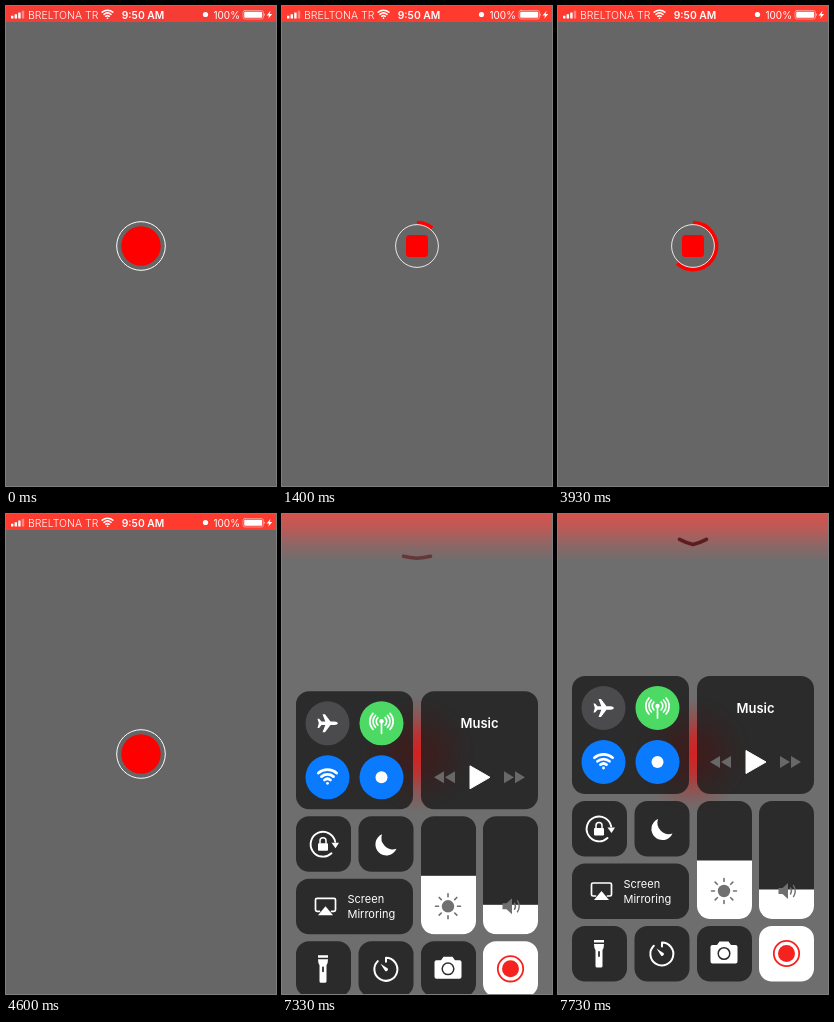
Animation of 270 by 480 pixels, one loop 7790 ms. Source, as an HTML page:

```html
<!DOCTYPE html>
<html lang="en">
<head>
<meta charset="utf-8">
<title>Record button</title>
<style>
  html, body { margin: 0; height: 100%; overflow: hidden; background: #666; }
  svg { display: block; width: 100vw; height: 100vh; font-family: Inter, Roboto, sans-serif; }
  .line { fill: none; stroke: #fff; stroke-linecap: round; stroke-linejoin: round; }
  .panel { fill: #1c1c1c; fill-opacity: .81; }
  .white { fill: #fff; }
  .gray { fill: #707070; }
</style>
</head>
<body>
<svg viewBox="0 0 270 480">
  <defs>
    <linearGradient id="topTint" x2="0" y2="1">
      <stop offset="0" stop-color="#d2544f"/>
      <stop offset=".3" stop-color="#bb5a57"/>
      <stop offset=".65" stop-color="#8b6766"/>
      <stop offset="1" stop-color="#6e6e6e"/>
    </linearGradient>
    <radialGradient id="glowTint">
      <stop offset="0" stop-color="#e01818" stop-opacity=".9"/>
      <stop offset=".35" stop-color="#d81c1c" stop-opacity=".7"/>
      <stop offset="1" stop-color="#a04040" stop-opacity="0"/>
    </radialGradient>
    <clipPath id="brightClip"><rect x="139" y="287" width="55" height="118" rx="13"/></clipPath>
    <clipPath id="volumeClip"><rect x="201" y="287" width="55" height="118" rx="13"/></clipPath>
    <g id="wifi" class="line" stroke-width="2.3">
      <path d="M-2.5-3.2A4 4 0 0 1 2.5-3.2M-5-6A7.8 7.8 0 0 1 5-6M-7.6-9A11.8 11.8 0 0 1 7.6-9"/>
      <circle r="1.2" cy="-.4" fill="#fff" stroke="none"/>
    </g>
  </defs>

  <rect width="270" height="480" fill="#666"/>
  <rect id="bar" width="270" height="16"/>
  <g class="white" font-size="10.5">
    <path d="M5 9.7h2.4v2.8H5zM8.6 8.3H11v4.2H8.6zM12.2 6.6h2.4v5.9h-2.4z"/>
    <path d="M15.8 4.7h2.4v7.8h-2.4z" opacity=".4"/>
    <text x="22" y="12.5" font-weight="300">BRELTONA TR</text>
    <use href="#wifi" transform="translate(101.5 12.5) scale(.7)"/>
    <text x="137" y="12.5" font-size="10.3" font-weight="600" text-anchor="middle">9:50 AM</text>
    <circle cx="199.5" cy="8.5" r="2.6"/>
    <text x="234" y="12.5" font-size="10" text-anchor="end">100%</text>
    <rect x="237" y="4.5" width="20.5" height="8.5" rx="2" class="line" stroke-width=".7" opacity=".6"/>
    <rect x="238.2" y="5.7" width="18" height="6.1" rx="1"/>
    <path d="M258.4 7.3q1.4 1.4 0 2.8zM264.6 4.8l-4 4.6h2.5l-.9 3.4 4-4.7h-2.5z"/>
  </g>

  <path id="arc" fill="none" stroke="#f00" stroke-width="4.1"/>
  <circle id="ring" cx="135" cy="240" fill="none" stroke="#fff"/>
  <rect id="core" fill="#f00"/>

  <g id="blur">
    <rect width="270" height="480" fill="#6e6e6e"/>
    <rect width="270" height="48" fill="url(#topTint)"/>
    <circle cx="135" cy="240" r="58" fill="url(#glowTint)"/>
  </g>

  <g id="center">
    <path id="chevron" class="line" style="stroke:#5c1c20" stroke-width="3.6"/>
    <g id="panels" class="panel"></g>

    <circle cx="45.5" cy="194" r="22" fill="#4b4b4d"/>
    <circle cx="99.5" cy="194" r="22" fill="#4cd964"/>
    <circle cx="45.5" cy="248" r="22" fill="#0a7aff"/>
    <circle cx="99.5" cy="248" r="22" fill="#0a7aff"/>
    <path class="white" transform="translate(45.5 194)" d="M10.5 0Q10-1.7 7-1.7H3L-2.5-9H-5L-2.2-1.7H-6L-8.4-4.6H-10L-8.7 0L-10 4.6H-8.4L-6 1.7H-2.2L-5 9H-2.5L3 1.7H7Q10 1.7 10.5 0Z"/>
    <g class="line" stroke-width="1.7" transform="translate(99.5 192)">
      <circle r="2.2" fill="#fff" stroke="none"/>
      <path d="M0 0V12M-3.6 3.8A5.2 5.2 0 0 1-3.6-3.8M3.6 3.8A5.2 5.2 0 0 0 3.6-3.8M-6 6A8.4 8.4 0 0 1-6-6M6 6A8.4 8.4 0 0 0 6-6M-8.5 8A11.7 11.7 0 0 1-8.5-8M8.5 8A11.7 11.7 0 0 0 8.5-8"/>
    </g>
    <use href="#wifi" transform="translate(45.5 254.5) scale(1.2)"/>
    <circle class="white" cx="99.5" cy="248" r="6"/>

    <text class="white" x="197.5" y="199" font-size="13" font-weight="600" text-anchor="middle">Music</text>
    <path class="white" d="M188 236.5V259.5L208 248Z" stroke="#fff" stroke-linejoin="round"/>
    <path fill="#686868" d="M162 242V254L152 248ZM173 242V254L163 248ZM222 242V254L232 248ZM233 242V254L243 248Z"/>

    <g class="line" stroke-width="1.9" transform="translate(41 315)">
      <path d="M8.5 9A12.4 12.4 0 1 1 12.2-2.5"/>
      <path class="white" stroke="none" d="M8.5-1.5H16L12.5 4Z"/>
      <rect class="white" x="-5" y="-1" width="10" height="7.5" rx="1" stroke="none"/>
      <path d="M-3-1V-3.5A3 3 0 0 1 3-3.5V-1" stroke-width="1.5"/>
    </g>
    <path class="white" d="M100 305A11 11 0 1 0 114.5 319.5A11.5 11.5 0 0 1 100 305Z"/>

    <path class="line" stroke-width="1.7" d="M37.5 382H35A1.5 1.5 0 0 1 33.5 380.5V370.5A1.5 1.5 0 0 1 35 369H52A1.5 1.5 0 0 1 53.5 370.5V380.5A1.5 1.5 0 0 1 52 382H49.5"/>
    <path class="white" d="M43.5 377L51 386H36Z"/>
    <g class="white" font-size="11">
      <text x="65.5" y="374">Screen</text>
      <text x="65.5" y="388.5">Mirroring</text>
    </g>

    <rect class="white" x="139" y="346.5" width="55" height="60" clip-path="url(#brightClip)"/>
    <rect class="white" x="201" y="375.5" width="55" height="30" clip-path="url(#volumeClip)"/>
    <circle class="gray" cx="166" cy="377" r="6.2"/>
    <path id="rays" class="line" style="stroke:#707070" stroke-width="1.6"/>
    <path class="gray" d="M220.5 374H224.5L230 369V385L224.5 380H220.5Z"/>
    <path class="line" style="stroke:#707070" stroke-width="1.4" d="M232.5 374Q234.5 377 232.5 380M235.5 371.5Q239 377 235.5 382.5"/>

    <path class="white" d="M36 426H46V428.5H36ZM36 430H46Q46 434 44.5 436V452Q44.5 453.5 43 453.5H39Q37.5 453.5 37.5 452V436Q36 434 36 430Z"/>
    <path d="M41 438V442" class="line" style="stroke:#2d2d2d" stroke-width="1.8"/>
    <g class="line" stroke-width="2" transform="translate(104 440)">
      <path d="M0-7.5V-11.5A11.5 11.5 0 1 1-8.2-8.2"/>
      <path class="white" stroke="none" d="M-5.5-5.5L1.8-.8A2 2 0 0 1-.8 1.8Z"/>
    </g>
    <path class="white" d="M154.5 431H159L161.5 427.5H170.5L173 431H177.5Q179.5 431 179.5 433V447.5Q179.5 449.5 177.5 449.5H154.5Q152.5 449.5 152.5 447.5V433Q152.5 431 154.5 431Z"/>
    <circle cx="166" cy="439.5" r="5.8" fill="#fff" stroke="#2d2d2d" stroke-width="1.5"/>
    <rect class="white" x="201" y="412" width="55" height="55.5" rx="13"/>
    <circle cx="228.5" cy="439.5" r="12.7" fill="none" stroke="#f5231f" stroke-width="1.8"/>
    <circle cx="228.5" cy="439.5" r="8.5" fill="#f5231f"/>
  </g>
</svg>
<script>
const LOOP = 7790, STEP = 200 / 3, CX = 135, CY = 240, TRAVEL = 317;
const $ = id => document.getElementById(id);
const set = (id, attrs) => { for (const k in attrs) $(id).setAttribute(k, attrs[k]); };
const clamp = x => Math.min(1, Math.max(0, x));
const smooth = x => { x = clamp(x); return x * x * (3 - 2 * x); };
const mix = (a, b, p) => a + (b - a) * p;

// Control center tiles: x, y, width, height
$('panels').innerHTML = [
  [14, 162, 117, 118], [139, 162, 117, 118],
  [14, 287, 55, 55.5], [76.5, 287, 55, 55.5],
  [139, 287, 55, 118], [201, 287, 55, 118], [14, 349.5, 117, 55.5],
  [14, 412, 55, 55.5], [76.5, 412, 55, 55.5], [139, 412, 55, 55.5]
].map(([x, y, w, h]) => `<rect x="${x}" y="${y}" width="${w}" height="${h}" rx="13"/>`).join('');

let rays = '';
for (let i = 0; i < 8; i++) {
  const c = Math.cos(i * Math.PI / 4), s = Math.sin(i * Math.PI / 4);
  rays += `M${166 + 9.5 * c} ${377 + 9.5 * s}L${166 + 12.5 * c} ${377 + 12.5 * s}`;
}
set('rays', { d: rays });

function arcPath(degrees) {
  const r = 23.3, a = degrees * Math.PI / 180;
  return `M${CX} ${CY - r}A${r} ${r} 0 ${+(degrees > 180)} 1 ${CX + r * Math.sin(a)} ${CY - r * Math.cos(a)}`;
}

function drawRecorder(t) {
  const pressed = smooth((t - 540) / 300) - smooth((t - 4300) / 290);
  const size = mix(39.5, 22, pressed);
  const recording = t > 845 && t < 4330;
  set('bar', { fill: t < 60 ? '#f53d36' : '#ff3b30' });
  set('ring', { r: mix(24.3, 21.4, pressed), 'stroke-width': mix(1, 0.85, pressed) });
  set('core', { x: CX - size / 2, y: CY - size / 2, width: size, height: size, rx: mix(20, 3.5, pressed) });
  set('arc', { d: recording ? arcPath((t - 845) * 0.072) : '' });
}

function drawControlCenter(t) {
  const since = t - 7200, open = since > -1;
  const offset = open ? TRAVEL * Math.exp(-since / 44) : 400;
  const shown = clamp(1.06 * (1 - offset / TRAVEL));
  const bend = clamp((since - 133) / 200);
  const h = mix(1, 2.6, bend);
  set('blur', { opacity: shown });
  set('center', { transform: `translate(0 ${offset})` });
  set('chevron', {
    d: `M121.5 ${28 - h}Q128 ${28 + h * 0.3} 135 ${28 + h}Q142 ${28 + h * 0.3} 148.5 ${28 - h}`,
    opacity: shown * mix(0.65, 1, bend)
  });
}

function frame(now) {
  const t = Math.floor((now % LOOP + 4) / STEP) * STEP;
  drawRecorder(t);
  drawControlCenter(t);
  requestAnimationFrame(frame);
}
frame(0);
</script>
</body>
</html>
```
